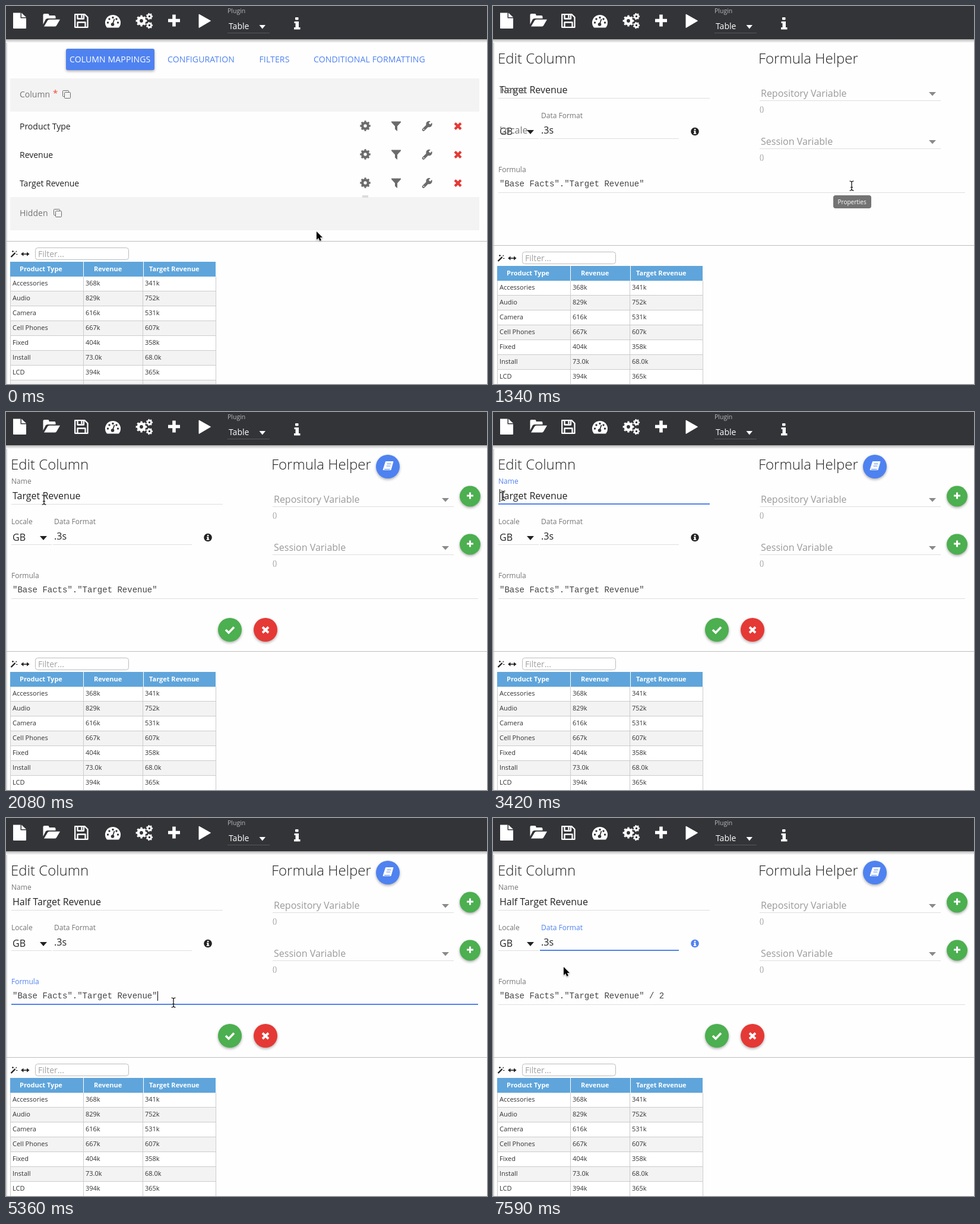
Animation, 810 px wide and 637 px high, one loop 8000 ms. Source, as an HTML page:

```html
<!DOCTYPE html>
<html lang="en">
<head>
<meta charset="utf-8">
<title>Edit column</title>
<style>
  html, body { margin: 0; width: 100%; height: 100%; overflow: hidden; background: #fefefe; }
  svg { display: block; width: 810px; height: 637px; }
  text { font-family: "Open Sans", sans-serif; white-space: pre; }
  .mono { font-family: "Liberation Mono", monospace; }
  .fab { filter: drop-shadow(0 2px 2px rgba(0,0,0,.32)); }
</style>
</head>
<body>
<svg id="stage" viewBox="0 0 810 637"></svg>
<script>
const BLUE = '#4f82f1', GREEN = '#4caf50', RED = '#e53935';
const INK = '#222', GRAY = '#757575', PALE = '#9a9a9a', RULE = '#dedede';

// Markup helpers
const text = (x, y, size, str, fill = INK, extra = '') =>
  `<text x="${x}" y="${y}" font-size="${size}" fill="${fill}" ${extra}>${str}</text>`;
const rect = (x, y, w, h, fill, extra = '') =>
  `<rect x="${x}" y="${y}" width="${w}" height="${h}" fill="${fill}" ${extra}/>`;
const path = (d, fill, extra = '') => `<path d="${d}" fill="${fill}" ${extra}/>`;
const line = (d, stroke, width, extra = '') =>
  `<path d="${d}" fill="none" stroke="${stroke}" stroke-width="${width}" ${extra}/>`;
const dot = (x, y, r, fill, extra = '') => `<circle cx="${x}" cy="${y}" r="${r}" fill="${fill}" ${extra}/>`;
const group = (id, content, extra = '') => `<g id="${id}" ${extra}>${content}</g>`;

const gear = (x, y, r, teeth, color) =>
  dot(x, y, r * .56, 'none', `stroke="${color}" stroke-width="${r * .5}"`) +
  dot(x, y, r * .85, 'none', `stroke="${color}" stroke-width="${r * .32}" pathLength="${teeth * 2}" stroke-dasharray="1" stroke-dashoffset=".5"`);
const copyIcon = (x, y) =>
  rect(x + 3.5, y + 3.5, 10, 10, 'none', 'rx="1" stroke="#6c6c6c"') +
  line(`M${x + 3} ${y + 10.5}h-1.5q-1 0-1-1v-8q0-1 1-1h8q1 0 1 1v1.5`, '#6c6c6c', 1);
const fab = (x, y, r, color, icon) => `<g class="fab">${dot(x, y, r, color)}</g>${icon}`;

const toolbar = () => {
  const w = '#fff', bar = '#333438';
  const dials = [[171.5, 28], [174, 22], [180, 19.5], [186, 22], [188.5, 28]];
  return rect(0, 56, 810, 6, 'url(#barShadow)') + rect(0, 0, 810, 56, bar) +
    path('M12 11.5h12.5v9H34V37q0 1-1 1H13q-1 0-1-1zM26 11.5l8 7.5h-8z', w) +
    path('M62.5 31V15q0-2 2-2h6q2 0 2 2v1h9q2 0 2 2v3H70q-2 0-3.2 1.6zM64 34.5l6-10q1-1.7 3-1.7H91L85 33q-1 1.5-3 1.5z', w) +
    line('M116.2 14.2h16.5l4.8 4.8v16.8h-21.3zM120.5 14.5v7h10.500v-7M120.5 35.500v-8h13v8M127.500 15v5', w, 2.3, 'stroke-linejoin="round"') +
    path('M180 15a13 13 0 0 1 11 20q-.7 1.500-2 1.500h-18q-1.300 0-2-1.500a13 13 0 0 1 11-20z', w) +
    dials.map(([x, y]) => dot(x, y, 1.7, bar)).join('') + dot(179.5, 31, 2.8, bar) +
    line('M179.5 31l3-9', bar, 1.8) +
    gear(228, 25, 9.3, 8, w) + gear(241.5, 17.5, 5.6, 7, w) + gear(241.5, 32.5, 5.6, 7, w) +
    line('M283 14.5v20M273 24.500h20', w, 5.6) +
    path('M325 14l19.500 11L325 36.500z', w, 'stroke="#fff" stroke-linejoin="round"') +
    rect(487, 19, 5.5, 4.5, w, 'rx="1"') + path('M485.500 26h7.500v10h2.500v3.500h-10.500V36h2.500v-7h-2z', w) +
    text(373, 12, 10.5, 'Plugin', '#b9b9bb') + text(375, 39, 14, 'Table', w) +
    path('M426.500 32h10.500l-5.250 6.500z', w) + rect(373, 45, 71, 1, '#56575b');
};

const listRow = (label, y) => text(23, y + 5, 14, label) +
  `<g transform="translate(0 ${y - 203})">` + gear(605, 202, 8.7, 8, '#6b6b6b') +
  path('M649 194.500h16v1.500l-6 6.500v8.500l-4-3.500v-5l-6-6.500z', '#6b6b6b') +
  line('M703 208.500l8-8', '#6b6b6b', 4.6, 'stroke-linecap="round"') + dot(712.5, 199, 5.2, '#6b6b6b') +
  line('M713 198.500l6-6', '#fefefe', 3.6) + dot(703.5, 208, 1, '#fefefe') +
  line('M756 197.500l10 10m0-10l-10 10', RED, 4.2) + '</g>';

const list = () => {
  const tab = (x, label, fill) => text(x, 95, 14, label, fill, 'letter-spacing=".14"');
  return `<g class="fab">${rect(101, 72, 149, 36, BLUE, 'rx="3"')}</g>` +
    tab(107, 'COLUMN MAPPINGS', '#fff') + tab(272, 'CONFIGURATION', BLUE) +
    tab(426.5, 'FILTERS', BLUE) + tab(518, 'CONDITIONAL FORMATTING', BLUE) +
    rect(7, 122, 790, 56, '#f3f3f3') + rect(7, 322, 790, 56, '#f3f3f3') +
    text(23, 154, 14, 'Column', GRAY) + text(79, 152, 15, '*', '#f44336') + copyIcon(95, 142) +
    ['Product Type', 'Revenue', 'Target Revenue'].map((s, i) => listRow(s, 203 + 48 * i)).join('') +
    text(23, 354, 14, 'Hidden', GRAY) + copyIcon(80, 342) + rect(600, 319, 10, 4, '#dcdcdc');
};

const helperField = (y, label) => text(451, y, 16, label, PALE) +
  path(`M734 ${y - 8}h12l-6 6.500z`, '#8a8a8a') + rect(449, y + 6, 305, 1, RULE) + text(449, y + 25, 12, '()', PALE);
const field = (id, x, y, width) => `<rect id="${id}Rule" x="${x}" y="${y}" width="${width}" height="1"/>`;

const edit = () => {
  const plus = y => fab(781.5, y, 17.5, GREEN, line(`M781.500 ${y - 6.500}v11M776 ${y - 1}h11`, '#fff', 3));
  const book = path('M639.500 83.500h12.500l-4 14H635z', '#fff', 'stroke="#fff" stroke-linejoin="round"') +
    line('M641.500 87.500h7M640.500 91h7M637 96.500h9.500', BLUE, 1.2);
  return text(8, 97, 24, 'Edit Column', INK, 'font-weight="300"') +
    text(447, 97, 24, 'Formula Helper', INK, 'font-weight="300"') +
    text(11, 147, 16, 'Target Revenue', INK, 'id="nameText"') +
    text(9, 121, 12, 'Name', GRAY, 'id="nameLabel"') + field('name', 9, 155, 356) +
    text(11, 217, 16, 'GB') + path('M57 209h12l-6 7z', INK) + rect(9, 223, 68, 1, RULE) +
    text(9, 189, 12, 'Locale', GRAY, 'id="localeLabel"') +
    text(81, 189, 12, 'Data Format', GRAY, 'id="dataLabel"') +
    text(81, 215, 16, '.3s', INK, 'id="dataText"') + field('data', 79, 223, 234) +
    dot(340, 211.5, 6.8, INK, 'id="infoIcon"') + rect(338.8, 207, 2.6, 2.2, '#fff') +
    path('M338 210.300h3.400v4h1v1.500h-4.800v-1.500h1.200v-2.500h-.8z', '#fff') +
    text(9, 280, 12, 'Formula', GRAY, 'id="formulaLabel"') +
    text(11, 304, 14, '', '#444', 'id="formulaText" class="mono"') + field('formula', 9, 314, 786) +
    helperField(153, 'Repository Variable') + helperField(234, 'Session Variable') +
    rect(0, 0, 1, 20, '#000', 'id="caret"') +
    group('buttons', fab(643, 92, 20, BLUE, book) + plus(142) + plus(223) +
      fab(377, 367, 20, GREEN, line('M370 367l5 5 9-9.500', '#fff', 3.6)) +
      fab(437, 367, 20, RED, line('M432 362.500l10 9.500m0-9.500l-10 9.500', '#fff', 3.8)));
};

const results = () => {
  const rows = [['Accessories', '368k', '341k'], ['Audio', '829k', '752k'], ['Camera', '616k', '531k'],
    ['Cell Phones', '667k', '607k'], ['Fixed', '404k', '358k'], ['Install', '73.0k', '68.0k'],
    ['LCD', '394k', '365k'], ['', '', '']];
  const header = (x, s) => text(x, 447, 11, s, '#fff', 'font-weight="700"');
  return rect(0, 396, 810, 1, '#bdbdbd') +
    line('M8.500 423l7-7', INK, 2.4) + line('M16.500 414.500l1.500-1.500M10 413.500h3M11.500 412v3M17 418.500h2.500', INK, 1.2) +
    line('M27 418h10', INK, 1.6) + path('M25 418l4.500-3.500v7zM39.500 418l-4.500-3.500v7z', INK) +
    rect(49.5, 407.5, 157, 20, '#fff', 'rx="4" stroke="#bcbcbc"') + text(54, 423, 14, 'Filter...', '#a2a2a2') +
    rows.map((cells, i) => {
      const y = 456 + 25 * i;
      return rect(7, y, 347, 25, i % 2 ? '#f3f3f3' : '#fff') + rect(7, y + 24, 347, 1, '#ccc') +
        cells.map((s, c) => text([11, 134, 234][c], y + 15, 11, s, '#333')).join('');
    }).join('') +
    line('M7.500 456v200M130.500 456v200M230.500 456v200M353.500 456v200', '#ccc', 1) +
    rect(7, 431, 346, 25, '#5fa5db') + line('M130.500 431v25M231.500 431v25', '#fff', 1) +
    header(23, 'Product Type') + header(148, 'Revenue') + header(241, 'Target Revenue');
};

const pointers = {
  arrow: path('M0 0V13.800L3.200 10.900 5.400 15.800 7.900 14.700 5.800 10H10z', '#000', 'stroke="#fff" stroke-width="1.100" paint-order="stroke" style="filter:drop-shadow(0 1px 1px rgba(0,0,0,.35))"'),
  beam: line('M-3.500-8Q0-8 0-5.500Q0-8 3.500-8M0-6V6M-3.500 8Q0 8 0 5.500Q0 8 3.500 8M-2 2.500h4', '#fff', 2.6, 'opacity=".7"') +
    line('M-3.500-8Q0-8 0-5.500Q0-8 3.500-8M0-6V6M-3.500 8Q0 8 0 5.500Q0 8 3.500 8M-2 2.500h4', '#000', 1.2),
  hand: path('M-2 1q2-2.500 4 0v5l6 1.500q2 1 1.500 3.500l-1.500 6h-8l-5.500-7q0-2.500 3.500-.500z', '#fff', 'stroke="#000"')
};

const $ = id => document.getElementById(id);
$('stage').innerHTML = `<defs>
  <linearGradient id="barShadow" x2="0" y2="1"><stop stop-color="#b5b5b5"/><stop offset="1" stop-color="#fefefe"/></linearGradient>
  <linearGradient id="edgeShadow"><stop stop-color="#c4c4c4"/><stop offset="1" stop-color="#fefefe"/></linearGradient></defs>` +
  rect(0, 0, 810, 637, '#fefefe') + rect(0, 56, 3, 581, 'url(#edgeShadow)') + toolbar() +
  group('list', list()) + group('edit', edit()) + group('results', results()) +
  group('tooltip', rect(573, 319, 64, 22, '#737373', 'rx="4"') + text(580.5, 334, 10, 'Properties', '#fff')) +
  Object.entries(pointers).map(([id, shape]) => group(id, shape)).join('');

// Each step holds until the next: [start ms, ...values]
const CURSOR = [
  [0, 523, 380, 'arrow'], [150, 530, 372, 'arrow'], [300, 556, 346, 'arrow'], [450, 590, 316, 'arrow'],
  [600, 604, 305, 'hand'], [740, 604, 304, 'hand'], [1190, 604, 303, 'beam'], [1490, 520, 282, 'arrow'],
  [1630, 240, 214, 'arrow'], [1780, 90, 172, 'arrow'], [2080, 64, 148, 'beam'], [2530, 58, 146, 'beam'],
  [2680, 40, 144, 'beam'], [2830, 26, 142, 'beam'], [2980, 20, 141, 'beam'], [3130, 17, 141, 'beam'],
  [3570, 46, 171, 'arrow'], [4610, 150, 250, 'arrow'], [4760, 281, 341, 'arrow'], [4910, 282, 322, 'arrow'],
  [5060, 282, 311, 'beam'], [6400, 268, 302, 'beam'], [6550, 200, 262, 'arrow'], [6700, 112, 226, 'arrow'],
  [6850, 94, 215, 'beam'], [7150, 108, 236, 'arrow'], [7290, 119, 251, 'arrow']];
const FOCUS = [[0, ''], [2380, 'name'], [5060, 'formula'], [7000, 'data']];
const NAME_KEYS = [[0, 0], [4010, 1], [4160, 2], [4310, 3], [4460, 4], [4610, 5]];
const FORMULA_KEYS = [[0, 0], [5810, 1], [5960, 2], [6110, 3], [6260, 4]];
const TOOLTIP = [[0, 0], [600, .5], [740, 1], [1490, .4], [1630, 0]];
const BUTTONS = [[0, 0], [1490, .6], [1630, 1]];
const FORMULA = '"Base Facts"."Target Revenue"';

const at = (steps, t) => steps.findLast(step => step[0] <= t).slice(1);
const set = (id, attrs) => Object.entries(attrs).forEach(([k, v]) => $(id).setAttribute(k, v));
const show = (id, visible) => set(id, { visibility: visible ? 'visible' : 'hidden' });

function floatLabel(id, x, y, dy, p) {
  set(id, { x: x + 2 * (1 - p), y: y + dy * (1 - p), 'font-size': 16 - 4 * p });
}

function placeCaret(focus, index, top, height) {
  const el = $(focus + 'Text');
  const x = +el.getAttribute('x') + (index ? el.getSubStringLength(0, index) : 0);
  set('caret', { x: Math.round(x), y: top, height });
}

function render(t) {
  const editing = t >= 1190;
  $('list').style.display = editing ? 'none' : '';
  $('edit').style.display = editing ? '' : 'none';
  set('results', { transform: `translate(0 ${editing ? 7 : 0})` });
  set('tooltip', { opacity: at(TOOLTIP, t)[0] });
  set('buttons', { opacity: at(BUTTONS, t)[0] });

  const [x, y, kind] = at(CURSOR, t);
  for (const id in pointers) show(id, id === kind);
  set(kind, { transform: `translate(${x} ${y})` });
  if (!editing) return;

  const p = 1 - (1 - Math.min(1, Math.max(0, (t - 1380) / 400))) ** 3;
  floatLabel('nameLabel', 9, 121, 26, p);
  floatLabel('localeLabel', 9, 189, 26, p);

  const [focus] = at(FOCUS, t), [typed] = at(NAME_KEYS, t), [added] = at(FORMULA_KEYS, t);
  $('nameText').textContent = 'Half '.slice(0, typed) + 'Target Revenue';
  $('formulaText').textContent = FORMULA + ' / 2'.slice(0, added);
  for (const [id, ruleY] of [['name', 155], ['data', 223], ['formula', 314]]) {
    const on = id === focus;
    set(id + 'Rule', { y: on ? ruleY - 1 : ruleY, height: on ? 2 : 1, fill: on ? BLUE : RULE });
    set(id + 'Label', { fill: on ? BLUE : GRAY });
  }
  set('infoIcon', { fill: focus === 'data' ? BLUE : INK });

  show('caret', focus && t < 7590);
  if (focus === 'name') placeCaret(focus, t < 3270 ? 7 : typed, 130, 22);
  if (focus === 'formula') placeCaret(focus, FORMULA.length + added, 292, 16);
  if (focus === 'data') placeCaret(focus, 2, 198, 22);
}

function tick() {
  render(performance.now() % 8000);
  requestAnimationFrame(tick);
}
tick();
</script>
</body>
</html>
```
